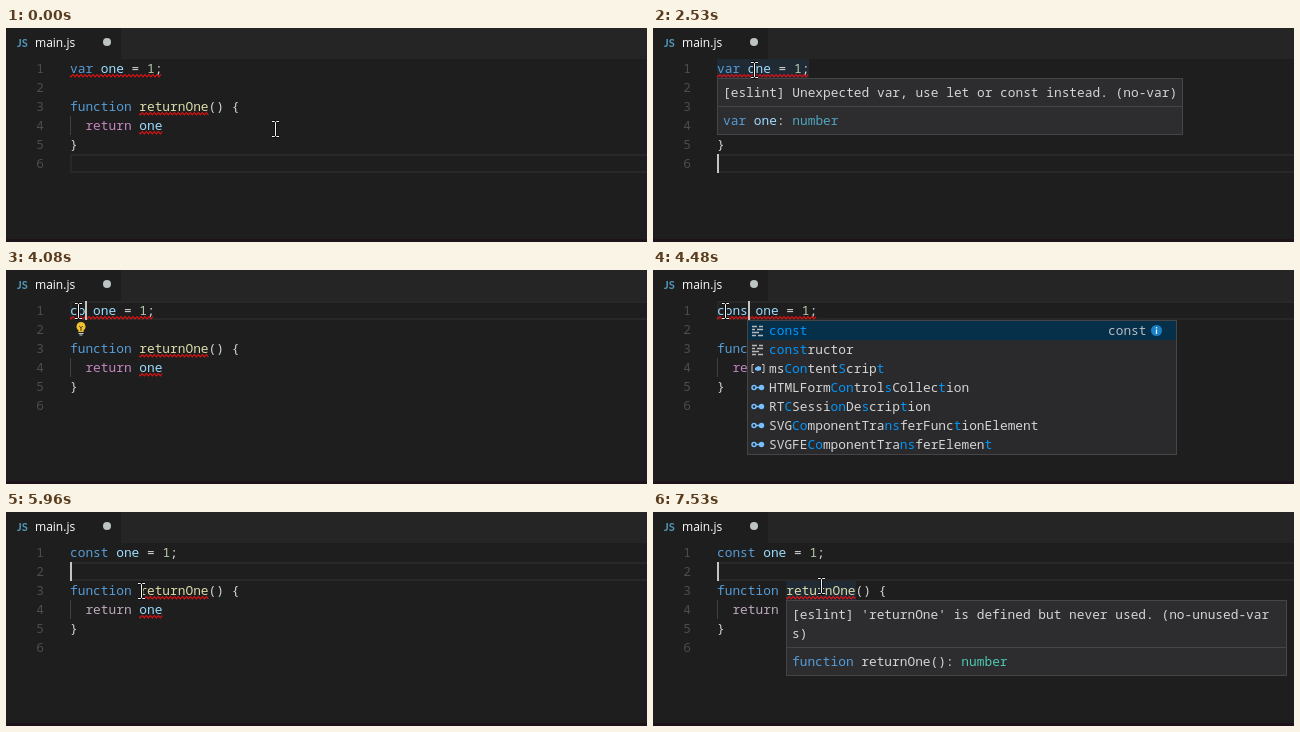
Recreate the animation shown at these times as an HTML page. Size 641 px wide and 214 px high, loop 8 s.

```html
<!DOCTYPE html>
<html lang="en">
<head>
<meta charset="utf-8">
<title>Editor linting</title>
<style>
html, body { margin: 0; width: 100%; height: 100%; overflow: hidden; background: #1e1e1e; }
#stage {
  position: absolute; left: 0; top: 0; width: 641px; height: 214px; overflow: hidden;
  background: #1e1e1e; color: #d4d4d4; white-space: pre;
  font: 12.83px/19px "Noto Sans Mono", "DejaVu Sans Mono", monospace;
  font-variant-ligatures: none;
}
#stage div, #stage svg { position: absolute; box-sizing: border-box; }
#bar { left: 115px; top: 0; right: 0; height: 31px; background: #252526; }
#lang { left: 11px; top: 5px; font: bold 11px/19px Lato, sans-serif; color: #519aba; }
#file { left: 29px; top: 5px; font: 12px/19px "Open Sans", "Noto Sans", sans-serif; color: #fff; }
#dirty { left: 97px; top: 10px; width: 8px; height: 8px; border-radius: 50%; background: #bcc4c4; }
#foot { left: 0; right: 0; bottom: 0; height: 3px; background: #1e121b; }
#code, #waves, #mouse { left: 0; top: 0; }
.num { left: 10px; width: 28px; text-align: right; color: #4c4c4c; }
.line { left: 64px; }
#current { left: 64px; right: -2px; height: 19px; border: 2px solid #282828; }
#guide { left: 64px; top: 88px; width: 1px; height: 19px; background: #404040; }
.mark { height: 19px; }
#caret { width: 2px; height: 19px; background: #c4c5c3; }
#waves { fill: none; stroke: #e81212; stroke-width: 1.1; }
.tip { background: #2d2d30; border: 1px solid #454545; }
.tip i { position: absolute; left: 0; right: 0; height: 1px; background: #454545; }
#list { top: 50px; width: 430px; background: #2a2a2c; border: 1px solid #454545; }
.row { left: 0; right: 0; height: 19px; }
.row b { font-weight: normal; color: #0097fb; }
.row:first-child { background: #062f4a; }
.row .label { left: 21px; }
.row svg { left: 3px; top: 3px; }
</style>
</head>
<body>
<div id="stage">
  <div id="bar"></div>
  <div id="lang">JS</div><div id="file">main.js</div><div id="dirty"></div>
  <div id="current"></div>
  <div id="hoverVar" class="mark" style="left:64px;top:31px;width:92px;background:#202a35"></div>
  <div id="hoverFn" class="mark" style="left:133px;top:69px;width:70px;background:#202a35"></div>
  <div id="selection" class="mark" style="left:64px;top:31px;width:23px;background:#264f78"></div>
  <div id="guide"></div>
  <div id="code"></div>
  <svg id="waves" width="641" height="214"><path id="wave1"/><path id="wave3"/><path id="wave4"/></svg>
  <div id="foot"></div>
  <svg id="bulb" style="left:69px;top:51px" width="12" height="15">
    <path d="M6 1a4.6 4.6 0 0 1 2.6 8.3V11H3.4V9.3A4.6 4.6 0 0 1 6 1z" fill="#f2c230"/>
    <path d="M4.2 5l1.8 1.8L7.8 5M6 6.8V10" fill="none" stroke="#3a3010"/>
    <path d="M3.5 12.5h5M4.5 14h3" stroke="#c8c8c8"/>
  </svg>
  <div id="caret"></div>
  <div id="tipVar" class="tip" style="left:64px;top:50px;width:466px;height:57px"></div>
  <div id="tipFn" class="tip" style="left:133px;top:88px;width:501px;height:76px"></div>
  <div id="list"></div>
  <svg id="mouse" width="11" height="18" fill="none">
    <path id="beamEdge" stroke="#101010" stroke-width="3"/>
    <path id="beam" stroke="#f4f4f4" stroke-width="1"/>
  </svg>
</div>
<script>
const LOOP = 8000, CHAR = 7.7;
const $ = id => document.getElementById(id);
const BLUE = '#569cd6', SKY = '#9cdcfe', TEAL = '#4ec9b0', PALE = '#dcdcaa', GREEN = '#b5cea8', PINK = '#c586c0';

const lineTop = n => 12 + 19 * n;
const colX = c => 64 + CHAR * c;
const ink = (color, text) => `<span style="color:${color}">${text}</span>`;
const put = (cls, top, html) => `<div class="${cls}" style="top:${top}px">${html}</div>`;
const show = (id, on) => { $(id).style.visibility = on ? 'visible' : 'hidden'; };
const at = (table, t) => table.filter(s => s[0] <= t).pop();

// typed keyword on line 1
const TYPED = [[0, 'var'], [3820, 'c'], [4080, 'co'], [4300, 'con'], [4440, 'cons'], [4540, 'const']];

// time, line, column, visible
const CARET = [
  [0, 6, 0, 0], [420, 6, 0, 1], [920, 6, 0, 0], [1420, 6, 0, 1], [1910, 6, 0, 0], [2400, 6, 0, 1],
  [2900, 6, 0, 0], [3010, 1, 3, 1], [3490, 1, 3, 0], [3820, 1, 1, 1], [4080, 1, 2, 1], [4300, 1, 3, 1],
  [4440, 1, 4, 1], [4540, 1, 5, 1], [5040, 1, 5, 0], [5530, 1, 5, 1], [5550, 2, 0, 1],
  [6030, 2, 0, 0], [6530, 2, 0, 1], [7030, 2, 0, 0], [7530, 2, 0, 1]
];

// time, x, y of the pointer
const PATH = [
  [0, 269, 101], [420, 269, 101], [1000, 119, 43], [2400, 119, 43], [2530, 101, 42], [2820, 72, 41],
  [5040, 72, 41], [5340, 79, 57], [5560, 79, 57], [5960, 135, 79], [6210, 168, 74], [LOOP, 168, 74]
];

// kind: k keyword, v variable, i interface; brackets mark matched letters
const WIDE = ['k[con]st', 'k[con]structor', 'k[con]tinue', 'v[con]firm', 'v[con]sole', 'i[Con]volverNode',
  'vms[Con]tentScript', 'iHTMLForm[Con]trolsCollection', 'iRT[C]Sessi[on]Description'];
const NARROW = ['k[const]', 'k[const]ructor', 'vms[Con]tent[S]crip[t]', 'iHTMLForm[Con]trol[s]Collec[t]ion',
  'iRT[C]Sessi[on]De[s]crip[t]ion', 'iSVG[Co]mponentTra[ns]ferFunc[t]ionElement',
  'iSVGFE[Co]mponentTra[ns]ferElemen[t]'];

const ICONS = {
  k: '<path d="M1 2.5h5M8 2.5h4M1 5.5h3M6 5.5h6M1 8.5h7M1 11.5h4M7 11.5h5" stroke="#b8b8b8" stroke-width="1.5"/>',
  v: '<path d="M3 2.5H1v8h2M11 2.5h2v8h-2" fill="none" stroke="#c5c5c5"/><path d="M4 6l3-2 3 1v3L7 9 4 8z" fill="#75beff"/>',
  i: '<path d="M5 6.5h4" stroke="#75beff" stroke-width="1.5"/><circle cx="3" cy="6.5" r="2" fill="none" stroke="#75beff" stroke-width="1.5"/><circle cx="10.5" cy="6.5" r="2.7" fill="#75beff"/>'
};
const DETAIL = '<div style="left:360px;color:#b4bcc2">const</div>' +
  '<svg style="left:402px;top:3px" width="13" height="13"><circle cx="6.5" cy="6.5" r="5.5" fill="#1b81c4"/>' +
  '<path d="M6.5 3v1.5M6.5 5.5v4.5" stroke="#dcefff" stroke-width="1.3"/></svg>';

function rows(items) {
  return items.map((s, n) => put('row', 19 * n,
    `<svg width="14" height="13">${ICONS[s[0]]}</svg><div class="label">` +
    s.slice(1).replace(/\[/g, '<b>').replace(/\]/g, '</b>') + '</div>' + (n ? '' : DETAIL))).join('');
}

function wave(id, line, from, to) {
  const y = lineTop(line) + 15.5, end = colX(to);
  let d = `M${colX(from)} ${y + 1.2}`;
  for (let x = colX(from) + 1, up = 0; x <= end; x += 2, up ^= 1) d += `L${x} ${y + (up ? 0 : 2.4)}`;
  $(id).setAttribute('d', to > from ? d : '');
}

function drawCode(word, late) {
  const kw = word === 'var' || word === 'const' ? BLUE : SKY;
  const text = [
    ink(kw, word) + ' ' + ink(SKY, 'one') + ' = ' + ink(GREEN, '1') + ';',
    '',
    ink(BLUE, 'function') + ' ' + ink(PALE, 'returnOne') + '() {',
    '  ' + ink(late ? '#bba9bd' : PINK, 'return') + ' ' + ink(SKY, 'one'),
    '}', ''
  ];
  $('code').innerHTML = text.map((s, n) =>
    put('num', lineTop(n + 1), n + 1) + put('line', lineTop(n + 1), s)).join('');
  wave('wave1', 1, 0, word === 'const' ? 0 : word.length + 9);
}

function drawList(word) {
  const narrow = word.length > 3, items = narrow ? NARROW : WIDE;
  $('list').innerHTML = rows(word === 'co' ? items.map(s => s.replace('[con]', '[co]n').replace('[Con]', '[Co]n')) : items);
  $('list').style.left = Math.round(colX(word.length)) - 1 + 'px';
  $('list').style.height = (narrow ? 135 : 230) + 'px';
}

function pointer(t) {
  const n = PATH.findIndex(p => p[0] > t), a = PATH[n - 1], b = PATH[n];
  const k = (t - a[0]) / (b[0] - a[0]), e = k * k * (3 - 2 * k);
  return [a[1] + (b[1] - a[1]) * e, a[2] + (b[2] - a[2]) * e];
}

const fade = (t, from, to, span) => t < from || t >= to ? 0 : Math.min(1, (t - from) / span);
const between = (t, a, b) => t >= a && t < b;

function setup() {
  const tip = (id, parts, rule) => {
    $(id).innerHTML = `<i style="top:${rule}px"></i>` +
      parts.map(([y, s]) => `<div style="left:5px;top:${y}px">${s}</div>`).join('');
  };
  tip('tipVar', [
    [4, '[eslint] Unexpected var, use let or const instead. (no-var)'],
    [32, ink(BLUE, 'var') + ' ' + ink(SKY, 'one') + ': ' + ink('#4fa6bd', 'number')]
  ], 27);
  tip('tipFn', [
    [4, "[eslint] 'returnOne' is defined but never used. (no-unused-var"],
    [23, 's)'],
    [51, ink(BLUE, 'function') + ' returnOne(): ' + ink(TEAL, 'number')]
  ], 46);
  wave('wave3', 3, 9, 18);
  wave('wave4', 4, 9, 12);
  const beam = 'M2 1.5H4.5L5.5 2.5L6.5 1.5H9M5.5 2.5V15.5M2 16.5H4.5L5.5 15.5L6.5 16.5H9';
  $('beam').setAttribute('d', beam);
  $('beamEdge').setAttribute('d', beam);
}

let last = '';
function render(t) {
  const word = at(TYPED, t)[1], late = t >= 5530;
  if (word + late !== last) {
    last = word + late;
    drawCode(word, late);
    drawList(word);
  }
  const [, line, col, on] = at(CARET, t);
  $('current').style.top = lineTop(line) + 'px';
  $('caret').style.left = Math.round(colX(col)) + 'px';
  $('caret').style.top = lineTop(line) + 'px';
  show('caret', on);
  show('hoverVar', between(t, 1330, 3010));
  show('hoverFn', t >= 6490);
  show('selection', between(t, 3010, 3820));
  show('bulb', between(t, 3340, 4150));
  show('list', between(t, 4150, 5550));
  $('tipVar').style.opacity = fade(t, 1330, 3010, 110);
  $('tipFn').style.opacity = fade(t, 6490, LOOP, 90);
  const [x, y] = pointer(t);
  $('mouse').style.transform = `translate(${Math.round(x) - 5}px,${Math.round(y) - 9}px)`;
}

setup();
render(0);
const start = performance.now();
(function frame() {
  render((performance.now() - start) % LOOP);
  requestAnimationFrame(frame);
})();
</script>
</body>
</html>
```
